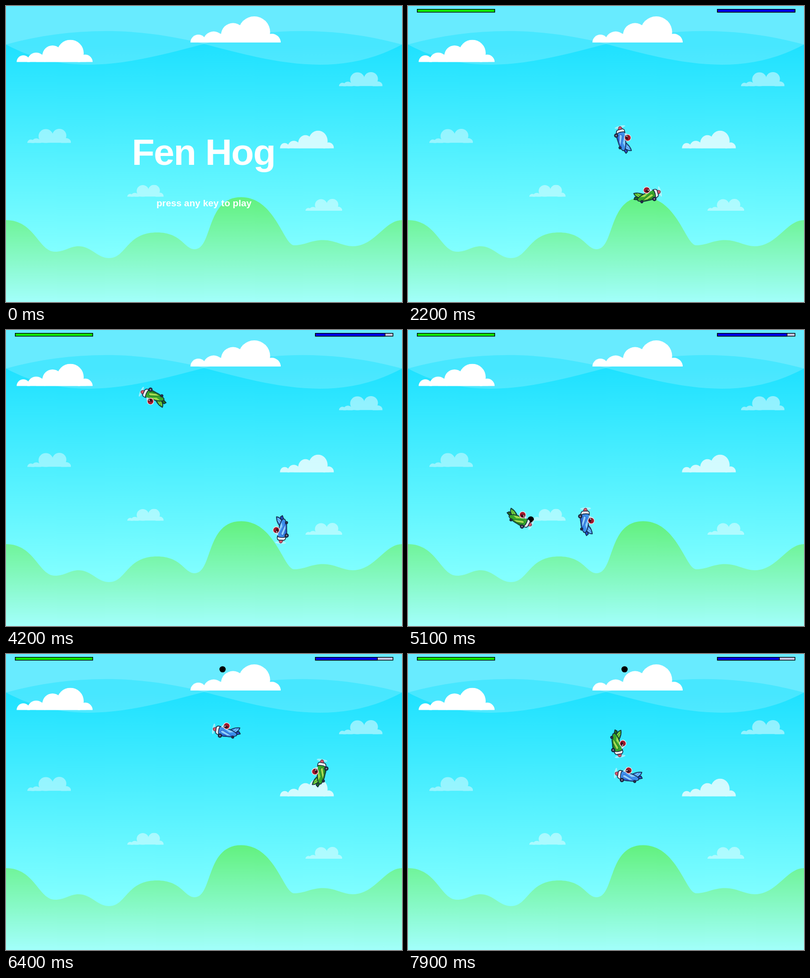
These frames come from a looping animation (800x600 px, 8 s). An HTML page:

```html
<!DOCTYPE html>
<html lang="en">
<head>
<meta charset="utf-8">
<title>Plane duel</title>
<style>
  html, body { margin: 0; width: 100%; height: 100%; overflow: hidden; }
  svg { display: block; width: 800px; height: 600px; }
  text { font-family: "Liberation Sans", Arial, sans-serif; font-weight: bold; fill: #fff; text-anchor: middle; }
  .outline { stroke: #10203c; stroke-width: 1.4; stroke-linejoin: round; }
  #green { --body: #36a62c; --dark: #1c7020; --light: #a5dc52; }
  #blue { --body: #3c8fea; --dark: #2350c4; --light: #8fd0fa; }
</style>
</head>
<body>
<svg viewBox="0 0 800 600">
  <defs>
    <linearGradient id="sky" gradientUnits="userSpaceOnUse" x1="0" y1="80" x2="0" y2="500">
      <stop stop-color="#1fe1ff"/><stop offset="1" stop-color="#82ffff"/>
    </linearGradient>
    <linearGradient id="land" gradientUnits="userSpaceOnUse" x1="0" y1="388" x2="0" y2="600">
      <stop stop-color="#62f17f"/><stop offset="1" stop-color="#a2fffb"/>
    </linearGradient>
    <symbol id="wide" viewBox="0 -45 154 45" preserveAspectRatio="none">
      <path d="M40 0V-15H73L92-20H130L141 0Z"/>
      <circle cx="14" r="13.500"/><circle cx="40" cy="-1" r="18"/><circle cx="73" cy="-13" r="20.500"/>
      <circle cx="109" cy="-18" r="27"/><circle cx="139" r="15"/>
    </symbol>
    <symbol id="small" viewBox="0 -29 87 29" preserveAspectRatio="none">
      <path d="M18 0L28-12H73L79 0Z"/>
      <circle cx="7" r="7"/><circle cx="18" r="9.500"/><circle cx="37" cy="-14" r="14.500"/>
      <circle cx="64" cy="-15" r="14"/><circle cx="77.500" r="10"/>
    </symbol>
    <g id="plane">
      <ellipse cx="26" rx="2.500" ry="11" fill="#dff6ff" opacity=".6"/>
      <path class="outline" d="M-17 6L-29 1L-26-3L-14 0Z" fill="var(--dark)"/>
      <path class="outline" d="M-17 2Q-26-4-26-11Q-17-11-8-4Z" fill="var(--body)"/>
      <path d="M-17-1L-23-8M-13-2L-19-8" stroke="var(--light)" stroke-width="1.500"/>
      <path d="M19-4Q27-3 27 0Q27 4 19 5Z" fill="#d8576a" stroke="#5b2740"/>
      <path class="outline" d="M-22 2Q-14-4 0-5Q13-8 20-6V8Q10 13-2 11Q-15 11-22 6Z" fill="var(--body)"/>
      <path d="M-19 5Q-5 10 13 8V10Q-4 12-19 5Z" fill="var(--dark)"/>
      <path d="M-15 0Q-5-4 3-3L-7 2Z" fill="var(--light)"/>
      <path class="outline" d="M14-7Q20-8 21-4V6Q20 10 14 10Q17 1 14-7Z" fill="#eef3f5"/>
      <path d="M-13 8L7 0Q13 1 10 5L-3 9Z" fill="var(--light)" stroke="var(--dark)"/>
      <circle class="outline" cx="11" cy="11.500" r="3.600" fill="#34344c"/>
      <circle cx="11" cy="11.500" r="1.200" fill="#aab"/>
      <circle class="outline" cx="-15" cy="10" r="2.300" fill="#34344c"/>
      <path d="M-4-4L9-11L12-6Z" fill="#bfeaff"/>
      <circle cx="1" cy="-10" r="6.500" fill="#a3182c" stroke="#f4e6ea" stroke-width="1.300"/>
      <path d="M-3-9L6-12L7-7L1-5Z" fill="#35101e"/>
      <path d="M2-10L6-10L5-7Z" fill="#e6c4c4"/>
    </g>
  </defs>

  <path fill="url(#sky)" d="M0 0H800V600H0Z"/>
  <g fill="#fff">
    <path opacity=".18" d="M0 0H800V78C667 150 533 112 400 77C267 42 133 42 0 78Z"/>
    <path opacity=".18" d="M0 0H800V78C667 42 533 42 400 77C267 112 133 150 0 78Z"/>
    <use href="#wide" x="21" y="68.500" width="154" height="45"/>
    <use href="#wide" x="372" y="21" width="183" height="53"/>
    <use href="#wide" x="553" y="252.500" width="109.500" height="36" opacity=".75"/>
    <use href="#small" x="672.500" y="134" width="88" height="28.500" opacity=".48"/>
    <use href="#small" x="43" y="249" width="88" height="28.500" opacity=".42"/>
    <use href="#small" x="245" y="362.500" width="73.500" height="24" opacity=".45"/>
    <use href="#small" x="605" y="391" width="74" height="24" opacity=".45"/>
  </g>
  <path fill="url(#land)" d="M0 434C58 434 66 498 99 498C120 498 128 487 147 487C172 487 185 511 208 511
    C243 511 243 459 305 459C355 459 360 493 381 493C418 493 403 387.500 475 387.500C543 387.500 561 485 582 485
    C605 485 615 474.500 641 474.500C665 474.500 680 487 701 487C745 487 765 434 800 434V600H0Z"/>

  <g id="intro">
    <text x="399" y="322" font-size="75" letter-spacing="-1.500">Fen Hog</text>
    <text x="400" y="406" font-size="19">press any key to play</text>
  </g>

  <g id="game">
    <g id="shots"></g>
    <use id="green" href="#plane"/>
    <use id="blue" href="#plane"/>
    <g stroke="#000" stroke-width="1.400">
      <rect x="18.700" y="6.700" width="156.500" height="5.800" fill="#1f0"/>
      <rect x="625.200" y="6.700" width="156.500" height="5.800" fill="#ccccf0"/>
      <rect x="625.200" y="6.700" height="5.800" fill="#00f" id="health"/>
    </g>
  </g>
</svg>
<script>
const LOOP = 8000, STEP = 100, START = 1100, SPEED = 0.45;
const $ = id => document.getElementById(id);
const rad = deg => deg * Math.PI / 180;

// Waypoints: time, x, y, heading in degrees
const greenPath = [
  [1100, 38, 428, 0], [1500, 181, 436, 8], [3000, 657, 465, 90], [4200, 297, 136, 205],
  [5100, 226, 383, 28], [6400, 634, 241, -80], [7900, 424, 182, 80]
];
const bluePath = [
  [1100, 762, 438, 180], [1500, 619, 424, 191], [3000, 571, 70, -17], [4200, 556, 405, 93],
  [5100, 360, 388, -93], [5850, 490, 110, 40], [6400, 445, 156, 190],
  [6950, 450, 20, 0], [7400, 550, 130, 100], [7900, 445, 246, 190]
];
// Shots: first and last time, reference time, x, y, heading, speed per ms
const shots = [
  [1400, 1900, 1500, 514, 402.5, 192.7, 0.8],
  [5100, 5400, 5100, 248, 384, 30, 0.8],
  [6000, 8000, 6400, 437.5, 31, 0, 0]
];
const dots = shots.map(() => {
  const dot = document.createElementNS("http://www.w3.org/2000/svg", "circle");
  dot.setAttribute("r", 6.3);
  return $("shots").appendChild(dot);
});

// Hermite curve between waypoints, giving position and direction of travel
function pose(path, time) {
  let i = 0;
  while (i < path.length - 2 && time >= path[i + 1][0]) i++;
  const [t0, x0, y0, a0] = path[i], [t1, x1, y1, a1] = path[i + 1];
  const span = t1 - t0, reach = SPEED * span;
  const u = Math.min(1, Math.max(0, (time - t0) / span));
  const axis = (p, q, m, n) => [
    p + (q - p) * u * u * (3 - 2 * u) + m * u * (1 - u) ** 2 - n * u * u * (1 - u),
    6 * (q - p) * u * (1 - u) + m * (1 - u) * (1 - 3 * u) + n * u * (3 * u - 2)
  ];
  const [x, dx] = axis(x0, x1, reach * Math.cos(rad(a0)), reach * Math.cos(rad(a1)));
  const [y, dy] = axis(y0, y1, reach * Math.sin(rad(a0)), reach * Math.sin(rad(a1)));
  return `translate(${x} ${y}) rotate(${Math.atan2(dy, dx) * 180 / Math.PI})`;
}

function draw(time) {
  const playing = time >= START;
  $("intro").style.display = playing ? "none" : "";
  $("game").style.display = playing ? "" : "none";
  $("green").setAttribute("transform", pose(greenPath, time));
  $("blue").setAttribute("transform", pose(bluePath, time) + " scale(1 -1)");
  $("health").setAttribute("width", time < 2400 ? 156.5 : time < 5900 ? 140.5 : 125);
  shots.forEach(([from, to, at, x, y, heading, speed], i) => {
    const way = (time - at) * speed;
    dots[i].setAttribute("cx", x + way * Math.cos(rad(heading)));
    dots[i].setAttribute("cy", y + way * Math.sin(rad(heading)));
    dots[i].style.display = time >= from && time < to ? "" : "none";
  });
}

const begin = performance.now();
function tick() {
  const time = (performance.now() - begin) % LOOP;
  draw(Math.floor(time / STEP) * STEP);
  requestAnimationFrame(tick);
}
tick();
</script>
</body>
</html>
```
